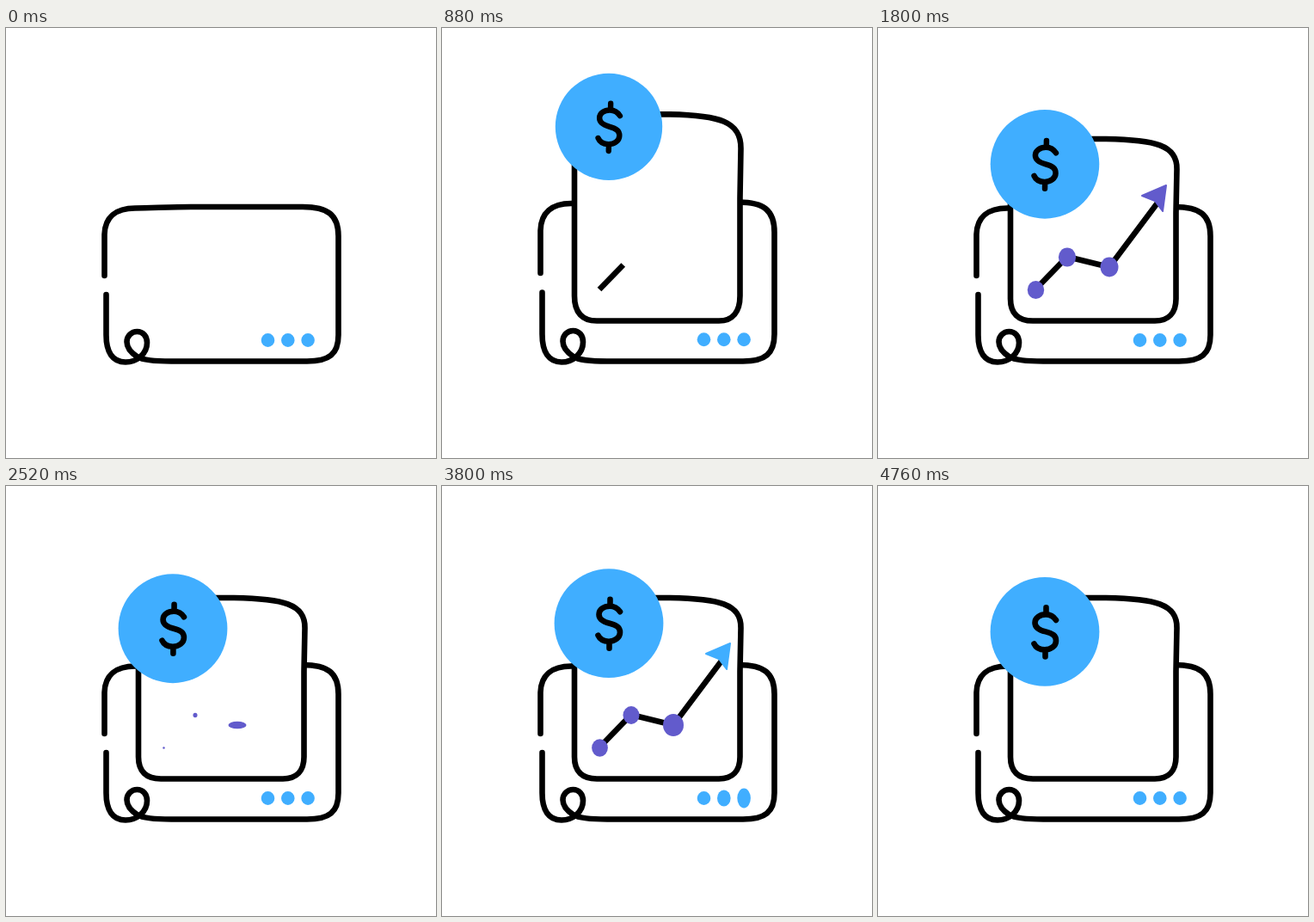
Recreate the animation shown at these times as an HTML page with a canvas. Size 500 px wide and 500 px high, loop 4.8 s.

```html
<!DOCTYPE html>
<html>
<head>
<meta charset="utf-8">
<style>
html, body { margin: 0; width: 100%; height: 100%; overflow: hidden; background: #fff; }
canvas { display: block; width: 500px; height: 500px; }
</style>
</head>
<body>
<canvas id="stage" width="500" height="500"></canvas>
<script>
const ctx = document.getElementById('stage').getContext('2d');
const LOOP = 4800, STEP = 40, TAU = 2 * Math.PI;
const BLUE = '#40aeff', PURPLE = '#625bcc', BLACK = '#000';
const PEN = 6.6;

const BODY = new Path2D('M114.5 288 V240 C115 220 128 209.5 150 209.5 C175 209 195 208 215 208 H345 ' +
  'C374 208 386.5 217 386.5 242 V357 C386.5 379 376 387.5 350 387.5 H192 C172 387.5 159 386 153 382.5 ' +
  'C146 378 140.5 372 140.5 365 C140.5 358 146 353 152.5 353 C159 353 164 358 164 366 ' +
  'C164 379 152 388.5 139 388.5 C124 388.5 116.5 377 116.5 357 V310');
const SHEET = new Path2D('M154 150 C154 138 163 130 178 130 H265 ' +
  'C322 131 348 137 347.5 165 L346.5 215 V315 C346.5 331 338 340.5 322 340.5 H180 C163 340.5 154 332 154 315 Z');
const DOLLAR = new Path2D('M1.5 -28 V-20 M13 -13.5 C10 -18 6 -20 1 -20 C-6 -20 -11.5 -16 -11.5 -10.5 ' +
  'C-11.5 -5 -7 -2 1 0 C9 2 13 4.5 13 10.5 C13 16.5 7 21 0 21 C-6 21 -10.5 18.5 -12.5 14 M.5 21.5 V29');
const LINE = new Path2D('M183 304 L220 266 L269 278 L326 202');
const ARROW = new Path2D('M335 183 L331 213 L322 201 L307 195 Z');
const LINE_LENGTH = 200;

const clamp = x => Math.max(0, Math.min(1, x));
const ramp = (t, from, span) => (1 - Math.cos(Math.PI * clamp((t - from) / span))) / 2;
const ring = (t, period, decay) => Math.exp(-t / decay) * Math.cos(TAU * t / period);
const spring = (t, period, decay) => t <= 0 ? 0 : 1 - ring(t, period, decay);
const bump = (t, peak, half) => ramp(t, peak - half, half) - ramp(t, peak, half);

function ellipse(x, y, rx, ry, color) {
  if (rx <= 0 || ry <= 0) return;
  ctx.fillStyle = color;
  ctx.beginPath();
  ctx.ellipse(x, y, rx, ry, 0, 0, TAU);
  ctx.fill();
}

function stroke(path, width = PEN, color = BLACK) {
  ctx.lineWidth = width;
  ctx.strokeStyle = color;
  ctx.stroke(path);
}

// Vertical scaling that keeps the pen width constant
function squash(path, baseY, s) {
  const scaled = new Path2D();
  scaled.addPath(path, new DOMMatrix([1, 0, 0, s, 0, baseY * (1 - s)]));
  return scaled;
}

function drawBody(t) {
  const u = Math.max(0, t - 300);
  const s = 1 - .43 * Math.exp(-u / 220) * Math.sin(TAU * u / 800);
  stroke(squash(BODY, 388, s));
  for (let i = 0; i < 3; i++) {
    const grow = 1 + .3 * (bump(t, 360 + 120 * i, 120) + bump(t, 1190 + 120 * i, 120));
    const tall = 1 + .45 * bump(t, 3630 + 80 * i, 170);
    ellipse(304.5 + 23.3 * i, 388 - 25 * s, 7.8 * grow, 7.9 * grow * tall, BLUE);
  }
}

function drawSheet(t) {
  const s = spring(t - 350, 1000, 273);
  if (s <= 0) return;
  const sheet = squash(SHEET, 340.5, s);
  ctx.fillStyle = '#fff';
  ctx.fill(sheet);
  stroke(sheet);
}

function drawChart(t) {
  const second = t >= 3000;
  const tin = second ? t - 2430 : t;
  const tout = second ? t - 2120 : t;

  const drawn = ramp(tin, 780, 340) - ramp(tout, 2160, 280);
  if (drawn > 0) {
    ctx.save();
    ctx.lineCap = 'butt';
    ctx.lineJoin = 'miter';
    ctx.setLineDash([drawn * LINE_LENGTH, LINE_LENGTH]);
    stroke(LINE);
    ctx.restore();
  }

  const head = ramp(tin, 1020, 150) - ramp(tout, 2120, 140);
  if (head > 0) {
    const color = second ? BLUE : PURPLE;
    ctx.save();
    ctx.translate(326, 202);
    ctx.scale(head, head);
    ctx.translate(-326, -202);
    ctx.fillStyle = color;
    ctx.fill(ARROW);
    stroke(ARROW, 2, color);
    ctx.restore();
  }

  [[183.5, 304.5], [220, 266.5], [269, 278]].forEach(([x, y], i) => {
    const grow = spring(tin - 1060 - 70 * i, 280, 100);
    const fade = 1 - clamp((tout - 2310 - 30 * i) / 240);
    const r = (9.7 + .4 * i) * grow;
    ellipse(x, y, i < 2 ? r * fade : r, (r + .9 * grow) * fade, PURPLE);
  });
}

function drawCoin(t) {
  const u = t - 640;
  if (u <= 0) return;
  const y = 159.7 + 10.2 * Math.cos(TAU * t / 800) + 140 * ring(u, 460, 250);
  const size = spring(u, 1000, 200);
  const sign = spring(u, 1000, 350);
  ellipse(194, y, 63.4 * size, 63.4 * size, BLUE);
  ctx.save();
  ctx.translate(194, y);
  ctx.rotate(48 * (1 - sign) * Math.PI / 180);
  ctx.scale(sign, sign);
  stroke(DOLLAR);
  ctx.restore();
}

function render(now) {
  const t = Math.floor((now % LOOP) / STEP) * STEP;
  ctx.fillStyle = '#fff';
  ctx.fillRect(0, 0, 500, 500);
  ctx.lineCap = ctx.lineJoin = 'round';
  drawBody(t);
  drawSheet(t);
  drawChart(t);
  drawCoin(t);
}

const start = performance.now();
function tick() {
  render(performance.now() - start);
  requestAnimationFrame(tick);
}
tick();
</script>
</body>
</html>
```
